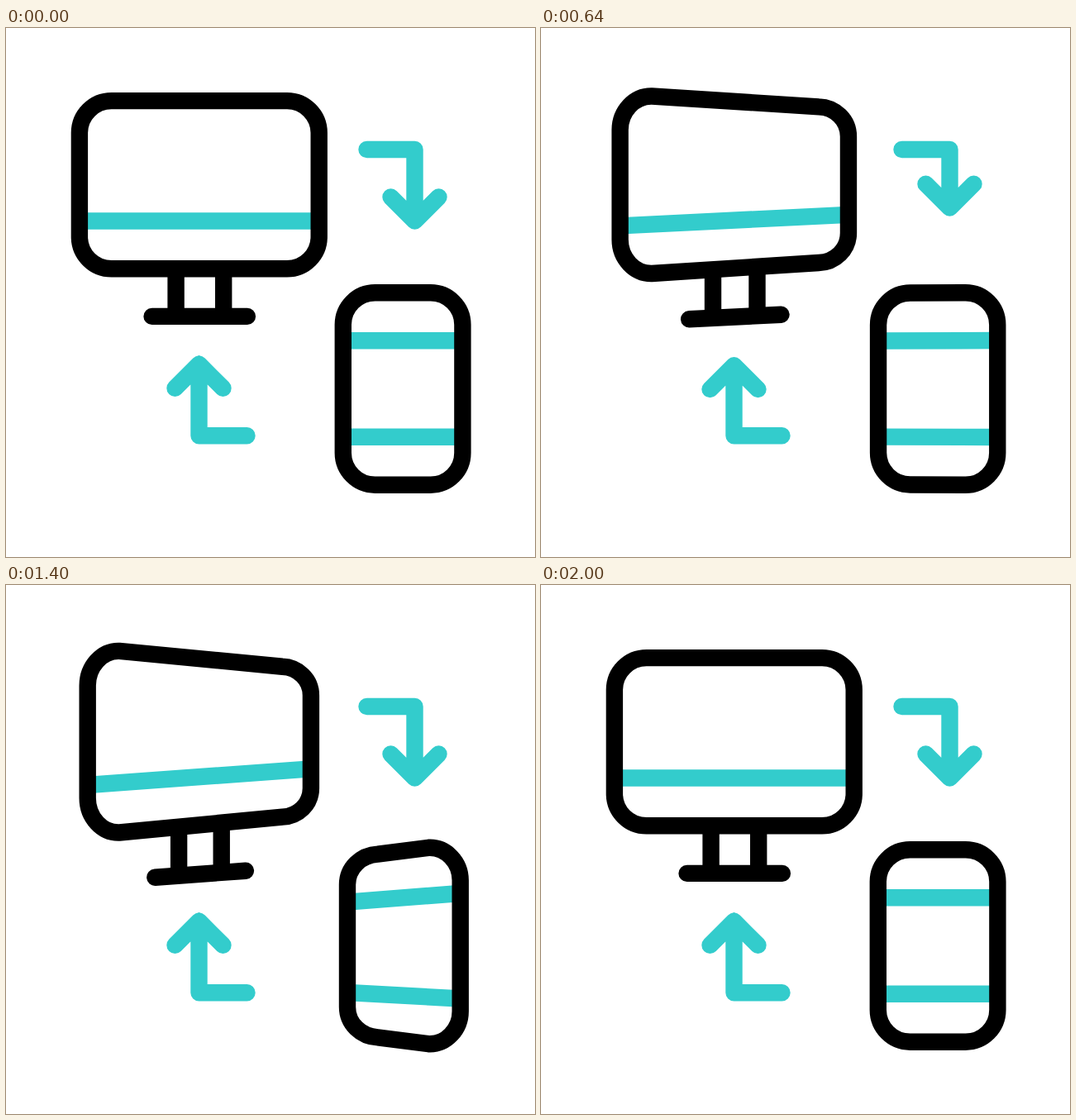
Animation, 640 px wide and 640 px high, one loop 2120 ms. Source, as an HTML page:

```html
<!DOCTYPE html>
<html lang="en">
<head>
<meta charset="utf-8">
<title>Device sync</title>
<style>
  html, body { margin: 0; width: 100%; height: 100%; overflow: hidden; background: #fff; }
  svg { display: block; width: 100%; height: 100%; }
  path { fill: none; stroke: #000; stroke-width: 20.4; }
  .teal { stroke: #3cc; }
  .round { stroke-linecap: round; stroke-linejoin: round; }
</style>
</head>
<body>
<svg viewBox="0 0 640 640">
  <path id="screenBand" class="teal"/>
  <path id="legs"/>
  <path id="base" class="round"/>
  <path id="screen"/>
  <path id="phoneBands" class="teal"/>
  <path id="phone"/>
  <path id="down" class="teal round"/>
  <path id="up" class="teal round"/>
</svg>
<script>
const LOOP = 2120, STEP = 40;
const PULL = 21.3, RADIUS = 38.7, ROUND = .552, LEAN = .4;

// inset and scale say how far each side moves in and grows at full tilt
const screenBox = { left: 88.9, right: 378.7, mid: 189.7, half: 101.6, inset: [10.3, 10.3], scale: [1.085, .89] };
const phoneBox = { left: 407.8, right: 552.4, mid: 436.5, half: 116.2, inset: [5.2, 2.7], scale: [.954, 1.0215] };

const ease = x => x < .5 ? 4 * x ** 3 : 1 - 4 * (1 - x) ** 3;
const ramp = (t, from, to) => ease(Math.min(1, Math.max(0, (t - from) / (to - from))));
const pulse = (t, a, b, c, d) => ramp(t, a, b) - ramp(t, c, d);
const set = (id, d) => document.getElementById(id).setAttribute("d", d);

function side(box, i, p) {
  const dir = i ? -1 : 1, s = 1 + (box.scale[i] - 1) * p;
  const x = (i ? box.right : box.left) + dir * box.inset[i] * p;
  const rx = dir * RADIUS * Math.min(1, s);
  return { x, rx, ry: RADIUS * s, turn: x + rx, height: box.half * s };
}

// Corner points as [x, height above the middle], from the side to the top edge
function corner({ x, rx, ry, turn, height }, slope) {
  return [
    [x, height - ry],
    [x, height - ry * (1 - ROUND)],
    [turn - ROUND * rx, height - LEAN * slope * ROUND * rx],
    [turn, height]
  ];
}

function outline(box, p) {
  const a = side(box, 0, p), b = side(box, 1, p);
  const slope = (b.height - a.height) / (b.turn - a.turn);
  const half = [...corner(a, slope), ...corner(b, slope).reverse()];
  const top = half.map(([x, h]) => [x, box.mid - h]);
  const bottom = half.map(([x, h]) => [x, box.mid + h]).reverse();
  const run = ([a0, a1, a2, a3, b0, b1, b2, b3]) => `${a0}C${a1} ${a2} ${a3}L${b0}C${b1} ${b2} ${b3}`;
  return `M${run(top)}L${run(bottom)}Z`;
}

// A level bar whose ends move in by inset and down by drop at full tilt
function bar(left, right, y, inset, drop, p) {
  return `M${left + inset[0] * p} ${y + drop[0] * p}L${right - inset[1] * p} ${y + drop[1] * p}`;
}
const band = (box, y, drop, p) => bar(box.left, box.right, y, box.inset, drop, p);

// dir is 1 for a head pointing down, -1 for up
function arrow(x, y, dir, pull) {
  const tip = y + dir * (86.5 - pull), wing = tip - dir * 29;
  return `M${x - dir * 58} ${y}H${x}V${tip}M${x - 29} ${wing}L${x} ${tip}L${x + 29} ${wing}`;
}

function draw(t) {
  const s = pulse(t, 350, 870, 1280, 1800);
  const p = pulse(t, 520, 1040, 1450, 1980);

  set("screen", outline(screenBox, s));
  set("screenBand", band(screenBox, 233.5, [8.9, -11.7], s));
  set("legs", `M${205.6 + 3.7 * s} 290V347M${263.2 - 2.6 * s} 290V347`);
  set("base", bar(176.6, 291.9, 348.9, [3.9, 2.1], [5.1, -3.3], s));

  set("phone", outline(phoneBox, p));
  set("phoneBands", band(phoneBox, 378.3, [5.3, -5.3], p) + band(phoneBox, 494.7, [-1.7, 5.8], p));

  set("up", arrow(233.5, 493.3, -1, PULL * pulse(t, 40, 350, 350, 736)));
  set("down", arrow(494.5, 147, 1, PULL * pulse(t, 430, 780, 780, 1168)));
}

const start = performance.now();
function tick() {
  const t = (performance.now() - start) % LOOP;
  draw(Math.floor(t / STEP) * STEP);
  requestAnimationFrame(tick);
}
tick();
</script>
</body>
</html>
```
